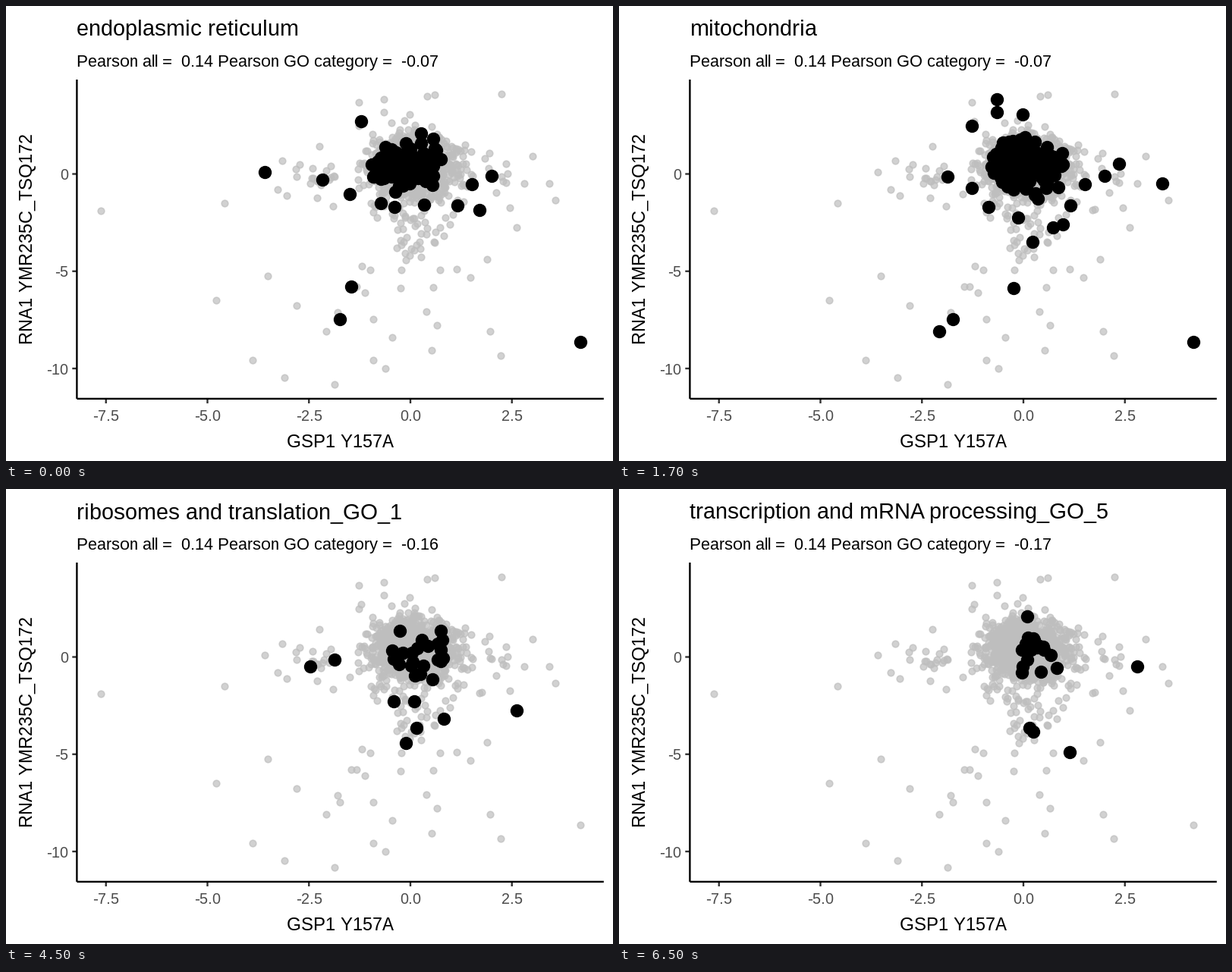
These frames come from a looping animation (800x600 px, 8000 ms). A matplotlib script:

```python
import numpy as np
import matplotlib.pyplot as plt
from matplotlib.animation import FuncAnimation

WIDTH, HEIGHT, DPI = 800, 600, 160
INTERVAL, FRAMES = 500, 16
LEFT, RIGHT, TOP, BOTTOM = 93.4, 787.8, 97, 517.9
GREY = (190 / 255, 190 / 255, 190 / 255, 0.7)

# Whole-pixel glyph advances.
plt.rcParams.update({"font.family": "Liberation Sans",
                     "text.hinting": "default", "text.hinting_factor": 1})
rng = np.random.default_rng(7)


def blob(count, centre, spread, limit=3.0):
    """Normal cloud, cut off at `limit` standard deviations."""
    unit = rng.normal(size=(count, 2))
    unit = unit[np.hypot(*unit.T) < limit]
    return np.array(centre) + unit * spread


# Points are in stage coordinates, y pointing down.
# Each category: its isolated points plus a random cluster.
reticulum = np.vstack([
    [(341, 219), (417, 229), (468, 152), (455, 370), (440, 413), (757, 443),
     (453, 248), (494, 260), (512, 265), (551, 262), (595, 263), (624, 269),
     (614, 235), (640, 224), (547, 168), (563, 175)],
    blob(115, (530, 213), (26, 16), 2.2),
])
mitochondria = np.vstack([
    [(498, 123), (498, 140), (465, 158), (532, 143), (433, 225), (465, 240),
     (487, 265), (526, 279), (545, 311), (572, 292), (585, 288), (595, 263),
     (614, 235), (640, 224), (659, 208), (716, 234), (757, 443), (440, 413),
     (422, 429), (520, 372)],
    blob(160, (536, 213), (25, 18), 2.4),
])
chromatin = np.vstack([
    [(288, 260), (664, 266), (716, 234), (526, 326), (534, 320), (480, 348),
     (594, 347), (437, 404), (422, 429)],
    blob(14, (547, 219), (9, 11), 2),
    blob(16, (540, 219), (42, 29), 1.8),
])
ribosomes = np.vstack([
    [(401, 234), (433, 225), (511, 280), (538, 280), (541, 315), (527, 335),
     (577, 303), (673, 292)],
    blob(26, (540, 217), (32, 20), 2),
])
transcription = np.vstack([
    [(538, 168), (541, 315), (546, 320), (594, 347), (683, 234)],
    blob(14, (542, 209), (8, 13), 2),
    blob(13, (538, 222), (32, 28), 1.8),
])

# Unhighlighted points: dense core, halo, side and lower tails, far outliers.
background = np.vstack([
    blob(560, (534, 210), (23, 17)),
    blob(300, (535, 218), (37, 29), 2.5),
    blob(24, (403, 227), (27, 22), 2),
    blob(14, (635, 222), (21, 24), 2),
    blob(26, (536, 303), (26, 17), 2),
    [(125, 270), (277, 388), (345, 356), (325, 467), (367, 490), (433, 499),
     (383, 395), (465, 127), (555, 119), (565, 117), (653, 116), (694, 198),
     (724, 256), (652, 461), (638, 429), (612, 358), (634, 334), (572, 348),
     (563, 371), (554, 403), (568, 421), (561, 454), (484, 413), (509, 437),
     (484, 467), (500, 478), (473, 378), (462, 370), (521, 348), (469, 343)],
])

# First frame, title, correlation within the category, highlighted points.
scenes = [
    (0, "endoplasmic reticulum", "-0.07", reticulum),
    (1, "mitochondria", "-0.07", mitochondria),
    (5, "chromatin organization_GO_2", "0.33", chromatin),
    (9, "ribosomes and translation_GO_1", "-0.16", ribosomes),
    (13, "transcription and mRNA processing_GO_5", "-0.17", transcription),
]
everything = np.unique(
    np.vstack([background] + [scene[3] for scene in scenes]), axis=0)

fig = plt.figure(figsize=(WIDTH / DPI, HEIGHT / DPI), dpi=DPI, facecolor="white")
ax = fig.add_axes([0, 0, 1, 1])
ax.set(xlim=(0, WIDTH), ylim=(HEIGHT, 0))
ax.axis("off")


def line(xs, ys, color):
    ax.plot(xs, ys, color=color, lw=1.07, solid_capstyle="butt",
            snap=False, zorder=5)


def label(x, y, text, size, color="black", **kwargs):
    return ax.text(x, y, text, size=size, color=color, va="baseline", **kwargs)


def dots(points, radius, color, zorder):
    return ax.scatter(points[:, 0], points[:, 1], s=(2 * radius) ** 2,
                      facecolors=[color], edgecolors=[color],
                      linewidths=0.71, zorder=zorder)


for value in (-7.5, -5.0, -2.5, 0.0, 2.5):
    x = 533 + 53.5 * value
    line([x, x], [BOTTOM, BOTTOM + 6.1], "#333333")
    label(x, 547, f"{value:.1f}", 8.8, "#4D4D4D", ha="center")
for value in (0, -5, -10):
    y = 221.5 - 25.65 * value
    line([LEFT - 6.1, LEFT], [y, y], "#333333")
    label(82, y + 7.5, str(value), 8.8, "#4D4D4D", ha="right")
line([LEFT, LEFT], [TOP, BOTTOM], "black")
line([LEFT, RIGHT], [BOTTOM, BOTTOM], "black")

label(441, 582, "GSP1 Y157A", 11, ha="center")
label(35.5, 307.5, "RNA1 YMR235C_TSQ172", 11, ha="center",
      rotation=90, rotation_mode="anchor")
title = label(93, 39, "", 13.2)
subtitle = label(93, 80, "", 9.9)

dots(everything, 1.95, GREY, 2)
highlight = dots(reticulum, 3.555, "black", 3)


def update(frame):
    _, name, correlation, points = [s for s in scenes if s[0] <= frame][-1]
    title.set_text(name)
    subtitle.set_text(f"Pearson all =  0.14 Pearson GO category =  {correlation}")
    highlight.set_offsets(points)
    return title, subtitle, highlight


animation = FuncAnimation(fig, update, frames=FRAMES, interval=INTERVAL,
                          repeat=True, repeat_delay=0)
plt.show()
```
